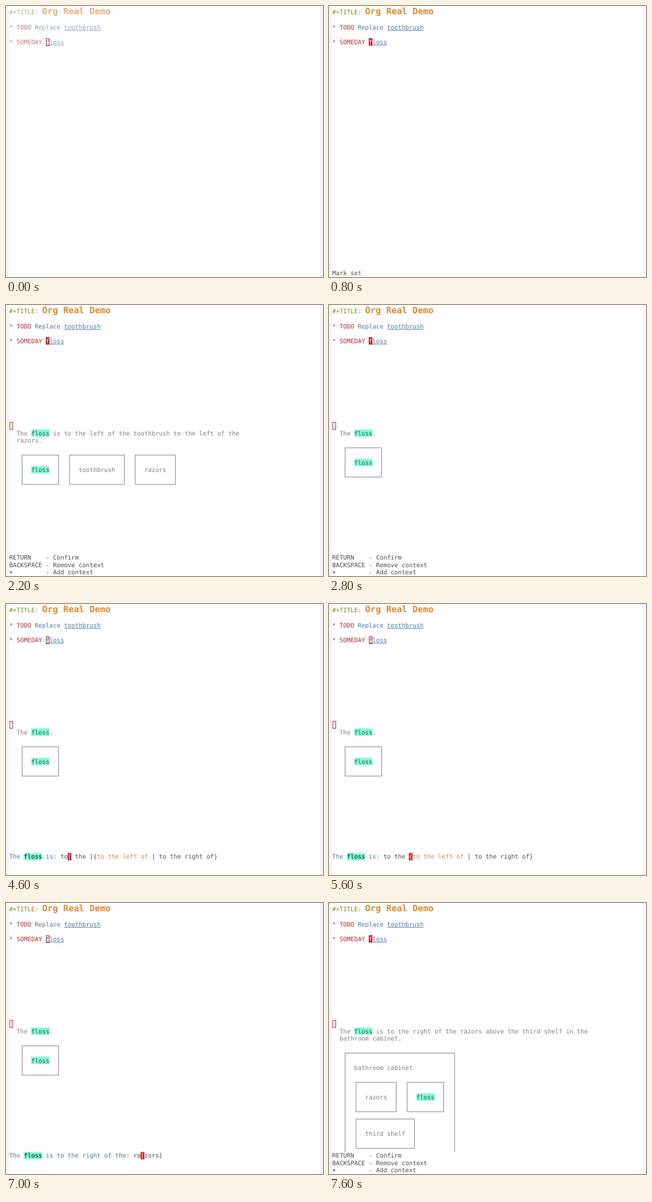
Recreate the animation shown at these times as an HTML page with a canvas. Size 540 by 461 pixels, loop 8000 ms.

```html
<!DOCTYPE html>
<html lang="en">
<head>
<meta charset="utf-8">
<title>Org Real Demo</title>
<style>
  html, body { margin: 0; width: 100%; height: 100%; overflow: hidden; background: #fefdff; }
  canvas { display: block; }
</style>
</head>
<body>
<canvas id="stage" width="540" height="461"></canvas>
<script>
const ctx = document.getElementById('stage').getContext('2d');
const LOOP = 8000, W = 540, H = 461;
const LEFT = 5.6, CELL = 6.22, ROW = 12.46, COLUMNS = 85;
const POPUP_Y = 205.5, MINI_ROW = 18;
const FONT = '"DejaVu Sans Mono", monospace';
const C = {
  page: '#fefdff', fringe: '#f4f3f8', green: '#7d8f14', orange: '#e0892c',
  blue: '#4a78ad', red: '#b0302a', ink: '#4d4d4d', gray: '#808080',
  line: '#8c8f98', mark: '#7fffd4', cursor: '#c41a26', hollow: '#b0302a'
};

const colX = col => LEFT + col * CELL;
const rowY = row => POPUP_Y + row * ROW;

function glyphs(text, x, y, color, size = 10.33, step = CELL, weight = '') {
  ctx.font = `${weight} ${size}px ${FONT}`;
  ctx.fillStyle = color;
  [...text].forEach((ch, i) => { if (ch !== ' ') ctx.fillText(ch, x + i * step, y); });
}

function put(text, col, y, color) {
  glyphs(text, colX(col), y + 3.7, color);
}

function block(col, y, count, color) {
  ctx.fillStyle = color;
  ctx.fillRect(colX(col), y - 6.2, count * CELL, ROW);
}

function hollowCursor(col, y) {
  ctx.strokeStyle = C.hollow;
  ctx.lineWidth = 1;
  ctx.strokeRect(Math.round(colX(col)) + 0.5, Math.round(y - 6.2) + 0.5, 5, 12);
}

function highlighted(col, y, color) {
  block(col, y, 5, C.mark);
  put('floss', col, y, color);
}

function link(text, col, y) {
  put(text, col, y, C.blue);
  ctx.fillRect(colX(col), y + 5, text.length * CELL, 0.9);
}

function drawDocument(alpha, solid) {
  ctx.globalAlpha = alpha;
  glyphs('#+TITLE:', LEFT, 14, C.green);
  glyphs('Org Real Demo', colX(9), 14.2, C.orange, 14.9, 8.97, 'bold');
  put('*', 0, 36, C.blue);
  put('TODO', 2, 36, C.red);
  put('Replace', 7, 36, C.blue);
  link('toothbrush', 15, 36);
  put('*', 0, 61, C.blue);
  put('SOMEDAY', 2, 61, C.red);
  link('floss', 10, 61);
  ctx.globalAlpha = 1;
  if (solid) {
    block(10, 61, 1, C.cursor);
    put('f', 10, 61, '#fff');
  } else hollowCursor(10, 61);
}

function frame(col, row, cols, rows) {
  ctx.strokeStyle = C.line;
  ctx.lineWidth = 1.1;
  ctx.strokeRect(colX(col + 0.5), rowY(row), cols * CELL, rows * ROW);
}

function thing(name, col, row) {
  frame(col, row, name.length + 5, 4);
  if (name === 'floss') highlighted(col + 3, rowY(row + 2), C.ink);
  else put(name, col + 3, rowY(row + 2), C.gray);
  return col + name.length + 8;
}

function drawPopup({ lines, things, shelf, cabinet }, bottom) {
  ctx.save();
  ctx.beginPath();
  ctx.rect(0, 190, W, bottom - 190);
  ctx.clip();
  hollowCursor(0, rowY(0));
  lines.forEach((text, i) => put(text, 2, rowY(1 + i), C.gray));
  highlighted(6, rowY(1), C.ink);
  const top = lines.length + 2 + (cabinet ? 4 : 0), start = cabinet ? 6 : 3;
  const end = things.reduce((col, name) => thing(name, col, top), start);
  if (shelf) thing('third shelf', start, top + 5);
  if (cabinet) {
    frame(3, top - 4, end - 3, 16);
    put('bathroom cabinet', 6, rowY(top - 2), C.gray);
  }
  ctx.restore();
}

function wrapMark(x, y, dir) {
  ctx.save();
  ctx.translate(x, y);
  ctx.scale(dir, 1);
  ctx.strokeStyle = C.ink;
  ctx.lineWidth = 1;
  ctx.beginPath();
  ctx.moveTo(-1.5, -2.5); ctx.lineTo(2, -2.5); ctx.lineTo(2, 1); ctx.lineTo(-2, 1);
  ctx.moveTo(0, -1); ctx.lineTo(-2, 1); ctx.lineTo(0, 3);
  ctx.stroke();
  ctx.restore();
}

// Writes coloured runs on the grid and wraps at the window edge.
function write(runs) {
  let col = 0, row = MINI_ROW;
  for (const [text, style] of runs) for (const ch of text) {
    if (col === COLUMNS) {
      wrapMark(537.5, rowY(row), 1);
      col = 0;
      row++;
      wrapMark(2.5, rowY(row), -1);
    }
    if (style === 'cursor') block(col, rowY(row), 1, C.cursor);
    if (style === 'mark') block(col, rowY(row), 1, C.mark);
    put(ch, col++, rowY(row), { cursor: '#fff', mark: '#000' }[style] || C[style]);
  }
}

const echo = row => () => put('Mark set', 0, rowY(row), C.ink);
const marked = echo(MINI_ROW);

function menu() {
  ['RETURN    - Confirm', 'BACKSPACE - Remove context', '+         - Add context']
    .forEach((text, i) => put(text, 0, rowY(MINI_ROW + i), C.ink));
}

function prompt(relation, typed = '', hint = ' ', first = '', rest = '') {
  return () => write([
    ['The ', 'blue'], ['floss', 'mark'], [` is${relation}: `, 'blue'], [typed, 'ink'],
    [hint[0], 'cursor'], [hint.slice(1), 'ink'], [first, 'orange'], [rest, 'ink']
  ]);
}

function prepositionPrompt(length) {
  const stem = 'to the ', typed = 'to the right of'.slice(0, length);
  if (length > stem.length) return prompt('', typed, `[${'to the right of'.slice(length)}]`);
  const known = stem.slice(length);
  return prompt('', typed, (known && `[${known}]`) + '{', 'to the left of', ' | to the right of}');
}

const SIDE = ' is to the left of the toothbrush';
const CHAIN = `The floss${SIDE} to the left of the`;
const TRIO = ['floss', 'toothbrush', 'razors'];
const popups = {
  full: { lines: [`${CHAIN} razors`, 'above the third shelf in the bathroom cabinet.'],
          things: TRIO, shelf: true, cabinet: true },
  shelf: { lines: [`${CHAIN} razors`, 'above the third shelf.'], things: TRIO, shelf: true },
  razors: { lines: [CHAIN, 'razors.'], things: TRIO },
  brush: { lines: [`The floss${SIDE}.`], things: TRIO.slice(0, 2) },
  alone: { lines: ['The floss.'], things: ['floss'] },
  moved: { lines: ['The floss is to the right of the razors above the third shelf in the',
                   'bathroom cabinet.'],
           things: ['razors', 'floss'], shelf: true, cabinet: true }
};

const RIGHT = ' to the right of the';
const timeline = [];
const at = (time, popup, mini, options = {}) =>
  timeline.push({ time, popup: popups[popup], mini, solid: true, alpha: 1, bottom: 423.6, ...options });
const asking = { solid: false };

at(0, null, null, { alpha: 0.66, solid: false });
at(300, null, null, { alpha: 0.78 });
at(400, null, null, { alpha: 0.89 });
at(500, null, null);
at(800, null, echo(20));
at(900, 'full', echo(20), { bottom: 448 });
at(1000, 'full', menu);
at(1800, 'full', marked);
at(1900, 'shelf', menu);
at(2000, 'shelf', marked);
at(2100, 'razors', marked);
at(2200, 'razors', menu);
at(2500, 'razors', marked);
at(2600, 'brush', menu);
at(2700, 'brush', marked);
at(2800, 'alone', menu);
at(3700, 'alone', marked);
at(3800, 'alone', prompt(''), asking);
at(3900, 'alone', prompt('', '', '{', 'in',
  ' | on | behind | in front of | above | below | to the left of | to the right of | on top of}'), asking);
at(4600, 'alone', prepositionPrompt(2), asking);
for (let n = 1; n <= 8; n++) at(5100 + n * 100, 'alone', prepositionPrompt(2 + n), asking);
at(6200, 'alone', prompt(RIGHT), asking);
at(6300, 'alone', prompt(RIGHT, '', '{', '',
  ' | bathroom cabinet | third shelf | razors | toothbrush | floss}'), asking);
for (let n = 1; n <= 4; n++)
  at(6800 + n * 100, 'alone', prompt(RIGHT, 'razors'.slice(0, n), `[${'razors'.slice(n)}]`), asking);
at(7500, 'alone', marked);
at(7600, 'moved', menu);

function draw(t) {
  const state = timeline.findLast(entry => entry.time <= t);
  ctx.fillStyle = C.page;
  ctx.fillRect(0, 0, W, H);
  ctx.fillStyle = C.fringe;
  ctx.fillRect(0, 0, 5, H);
  ctx.fillRect(535, 0, 5, H);
  drawDocument(state.alpha, state.solid);
  if (state.popup) drawPopup(state.popup, state.bottom);
  if (state.mini) state.mini();
}

ctx.textRendering = 'geometricPrecision';
const began = performance.now();
function tick() {
  draw((performance.now() - began) % LOOP);
  requestAnimationFrame(tick);
}
tick();
</script>
</body>
</html>
```
